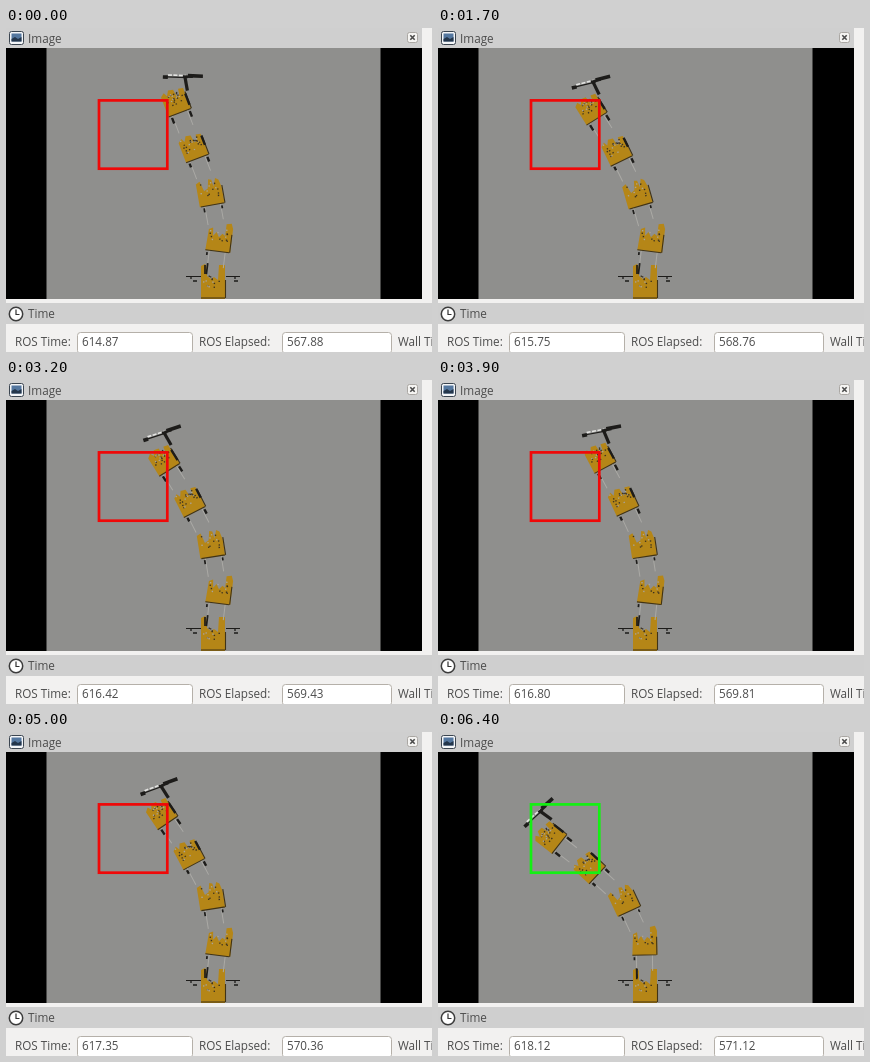
Recreate the animation shown at these times as an HTML page. Size 426 px wide and 324 px high, loop 6.5 s.

```html
<!DOCTYPE html>
<html lang="en">
<head>
<meta charset="utf-8">
<title>Robot arm camera view</title>
<style>
  html, body { margin: 0; width: 100%; height: 100%; overflow: hidden; background: #f2f1f0; }
  svg { display: block; }
  text { font: 11.7px "Open Sans", "Noto Sans", sans-serif; fill: #4c4c4c; }
  .body { fill: #b58617; }
  .edge { fill: none; stroke: #403316; }
  .dark { fill: none; stroke: #1d1c1a; }
  .pale { fill: none; stroke: #aaa9a5; }
  .field { fill: #fff; stroke: #b5b0a9; }
</style>
</head>
<body>
<svg width="426" height="324" viewBox="0 0 426 324">
  <rect width="426" height="324" fill="#f2f1f0"/>
  <rect y="20" width="416" height="251" fill="#000"/>
  <rect x="40.5" y="20" width="334" height="251" fill="#8f8f8d"/>

  <g id="arm">
    <path class="dark" d="M180 248.5H195M220 248.5H234" stroke-width="1.2"/>
    <path class="dark" d="M187 253H191M228 253H232M185 249V251M229 249V251" stroke-width="1.3"/>
  </g>
  <g id="tool">
    <path class="dark" d="M2 1L5 15" stroke-width="3.2"/>
    <path class="dark" d="M-16 2H5" stroke-width="1.2"/>
    <path d="M-15 0H3" stroke="#e4e4e2" stroke-width="1.6" stroke-dasharray="4 1.5"/>
    <path class="dark" d="M-20 2.2H-15M5 0H20" stroke-width="3.6"/>
    <path class="dark" d="M0 1H10" stroke-width="2.5"/>
  </g>
  <rect id="zone" x="93" y="72.4" width="68.3" height="68.3" fill="none" stroke-width="2.7"/>

  <path d="M0 271H426V324H0Z" fill="#f2f1f0"/>
  <path d="M0 0H416V20H0ZM0 275H426V296H0Z" fill="#cfcfcf"/>
  <text x="22" y="14.5">Image</text>
  <text x="22" y="290">Time</text>

  <rect x="3.5" y="3.5" width="14" height="13" rx="2" fill="#f4f6f8" stroke="#3b4550"/>
  <rect x="5.5" y="5.5" width="10" height="8" fill="#54779f"/>
  <path d="M5.5 13.5V11L9 9L12 11L15.5 9V13.5Z" fill="#24364b"/>
  <rect x="401.5" y="4.5" width="10" height="10" rx="2" fill="#f5f4f2" stroke="#aaa7a3"/>
  <path d="M404.3 7.3L408.7 11.7M408.7 7.3L404.3 11.7" stroke="#4a4a4a" stroke-width="1.6"/>
  <circle cx="10" cy="286" r="6.7" fill="#fff" stroke="#3c3c3c" stroke-width="1.5"/>
  <path d="M10 281.5V286.5H13.5" fill="none" stroke="#333" stroke-width="1.2"/>

  <rect class="field" x="71.5" y="304.5" width="115" height="21" rx="3"/>
  <rect class="field" x="276.5" y="304.5" width="109" height="21" rx="3"/>
  <text x="9" y="318">ROS Time:</text>
  <text id="ros" x="76" y="318"></text>
  <text x="193" y="318">ROS Elapsed:</text>
  <text id="elapsed" x="281" y="318"></text>
  <text x="392" y="318">Wall Time:</text>
</svg>
<script>
const LOOP = 6500, STEP = 100;
const BASE = { x: 207, y: 258 };
const LINKS = [47, 47, 49, 49];
const ELAPSED_OFFSET = 46.994;

// time, heading of each link in degrees, tool angle
const poses = [
  [0, 7, -10, -21, -21, 2],
  [350, -1, -25, -46, -51, -41],
  [700, 7, -7, -17, -15, 3],
  [1200, -1, -25, -46, -51, -40],
  [1700, 7, -16, -26, -32, -14],
  [2250, -1, -25, -46, -51, -41],
  [2800, 7, -11, -28, -34, -18],
  [3200, 7, -9, -27, -32, -18],
  [3500, 0, -23, -43, -48, -36],
  [4000, 7, -7, -23, -26, -8],
  [4450, -1, -25, -47, -53, -42],
  [5000, 7, -9, -28, -34, -20],
  [5350, -1, -25, -45, -50, -40],
  [5850, 6, -14, -31, -37, -24],
  [6400, -1, -25, -47, -52, -42]
];
const clock = [
  [0, 614.874], [700, 615.24], [1700, 615.75], [3200, 616.42],
  [3900, 616.8], [5000, 617.35], [6400, 618.116]
];

const outlines = [
  "M-12 13V-20L-8 -22L-6 -19V-10L-2 -7L1 -9L5 -6L6 -21H12V13Z",
  "M-12 12L-11 -9L-7 -11L-6 -3L-3 -7L0 -2L3 -6L6 -4V-16L11 -17L13 -12V12Z",
  "M-13 12V-11L-9 -13L-6 -3L-2 -5L0 -14L3 -13L4 -6L7 -14L10 -12L12 -4V12Z",
  "M-12 12V-9L-8 -12L-6 -8L-3 -13L2 -12L3 -4L6 -5L7 -11L12 -10V12Z",
  "M-12 12V-9L-8 -12L-6 -8L-3 -13L2 -12L3 -4L6 -5L7 -11L12 -10V12Z"
];
const struts = [
  "M-8 -21V-12",
  "M-8 25V36M-10 14V17",
  "M-9 14V18M9 14V17",
  "M-9 14V18M10 14V19M12 -8V2",
  "M-9 14V20M10 14V20M12 -4V8"
];

const byId = id => document.getElementById(id);
const arm = byId("arm");

function add(parent, tag, attrs) {
  const node = document.createElementNS("http://www.w3.org/2000/svg", tag);
  for (const name in attrs) node.setAttribute(name, attrs[name]);
  return parent.appendChild(node);
}

let seed = 11;
const random = () => (seed = seed * 16807 % 2147483647) / 2147483647;

function makeModule(outline, index) {
  const group = add(arm, "g", {});
  if (index) add(group, "path", { class: "pale", d: "M-8 12V31M8 12V28" });
  add(group, "path", { class: "body", d: outline });
  add(group, "path", { class: "edge", d: "M-12 12H12M12.5 -6V12", "stroke-width": 1.1 });
  add(group, "path", { class: "dark", d: struts[index], "stroke-width": index > 2 ? 2.4 : 1.7 });
  const count = index > 2 ? 24 : 13;
  for (let i = 0; i < count; i++) {
    add(group, "rect", {
      x: (random() * 18 - 10).toFixed(1), y: (random() * 14 - 11).toFixed(1),
      width: 1.4, height: 1.3, fill: i % 3 ? "#3a3120" : "#a9a49a"
    });
  }
  return group;
}

const modules = outlines.map(makeModule);

function sample(keys, t, ease) {
  let i = 1;
  while (i < keys.length - 1 && t > keys[i][0]) i++;
  const from = keys[i - 1], to = keys[i];
  const k = ease((t - from[0]) / (to[0] - from[0]));
  return from.slice(1).map((v, n) => v + (to[n + 1] - v) * k);
}

const linear = k => k;
const swing = k => (1 - Math.cos(Math.PI * k)) / 2;

function advance(point, length, degrees) {
  const a = degrees * Math.PI / 180;
  return { x: point.x + length * Math.sin(a), y: point.y - length * Math.cos(a) };
}

function place(node, point, angle) {
  node.setAttribute("transform",
    `translate(${point.x.toFixed(2)} ${point.y.toFixed(2)}) rotate(${angle.toFixed(2)})`);
}

function draw(t) {
  const angles = sample(poses, t, swing);
  const toolAngle = angles.pop();
  let point = BASE;
  place(modules[0], point, 0);
  angles.forEach((angle, i) => {
    point = advance(point, LINKS[i], angle);
    place(modules[i + 1], point, angle);
  });
  const tip = advance(point, 26, toolAngle + 17);
  place(byId("tool"), { x: tip.x - 1, y: tip.y - 1.5 }, toolAngle);
  byId("zone").setAttribute("stroke", tip.x < 108 ? "#14f014" : "#f00808");

  const [ros] = sample(clock, t, linear);
  byId("ros").textContent = ros.toFixed(2);
  byId("elapsed").textContent = (ros - ELAPSED_OFFSET).toFixed(2);
}

const start = performance.now();
function frame() {
  const t = (performance.now() - start) % LOOP;
  draw(Math.floor(t / STEP) * STEP);
  requestAnimationFrame(frame);
}
frame();
</script>
</body>
</html>
```
